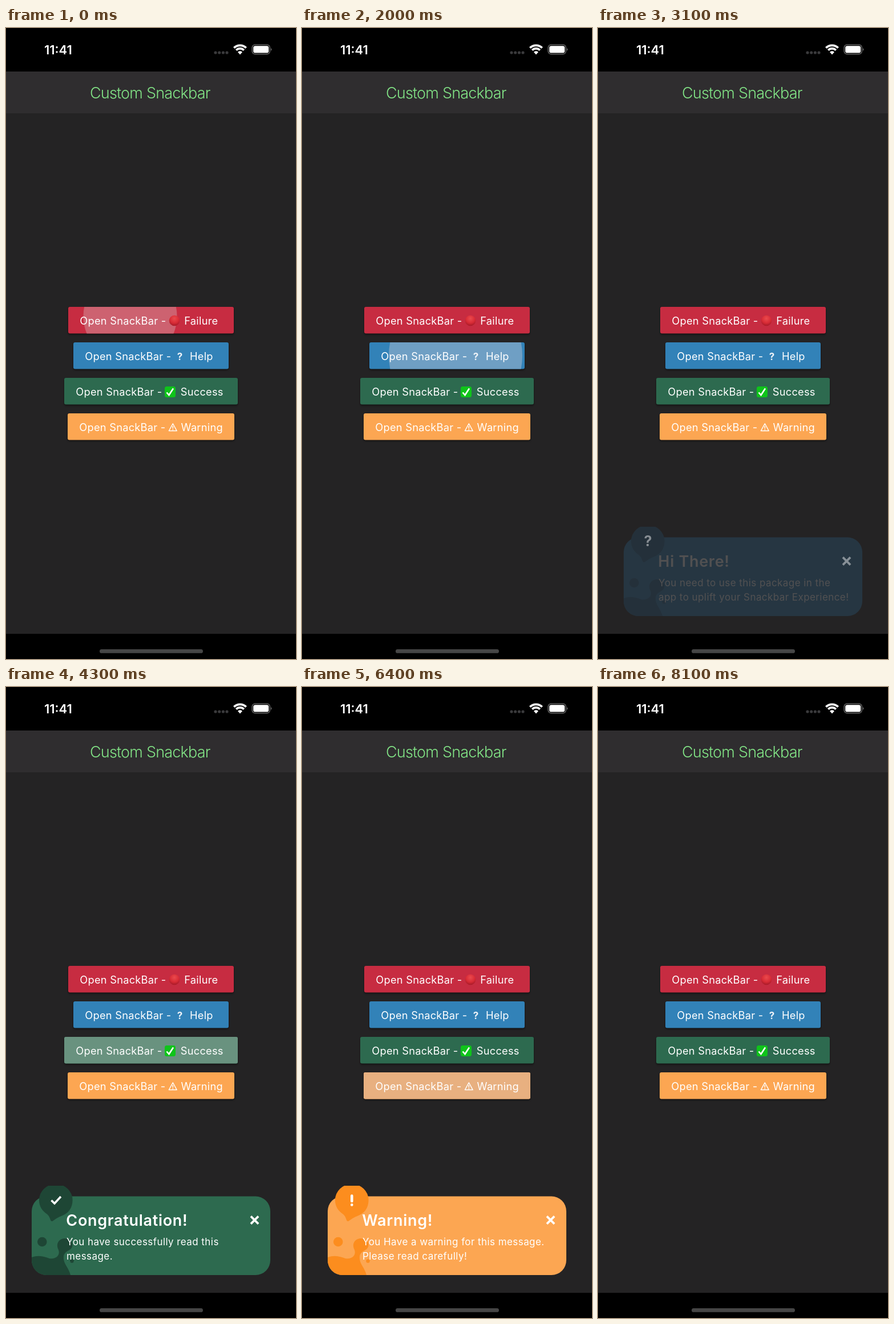
An HTML page that plays this animation: 508x1102 px, repeating every 8300 ms.

```html
<!DOCTYPE html>
<html lang="en">
<head>
<meta charset="utf-8">
<title>Custom Snackbar</title>
<style>
  html, body { margin: 0; width: 100%; height: 100%; overflow: hidden; background: #000; }
  svg { display: block; width: 508px; height: 1102px; font-family: Inter, Roboto, sans-serif; fill: #fff; }
  text { white-space: pre; }
  .btn { filter: drop-shadow(0 2px 1.5px #0007); }
  .label { font-size: 18.24px; letter-spacing: .25px; }
  .head { font-size: 27px; font-weight: 600; letter-spacing: .7px; }
  .msg { font-size: 17px; letter-spacing: .43px; }
  .line { fill: none; stroke: #fff; }
</style>
</head>
<body>
<svg viewBox="0 0 508 1102">
  <defs>
    <radialGradient id="ball" cx=".5" cy=".3" r=".7">
      <stop offset="0" stop-color="#ea4a4e"/><stop offset=".6" stop-color="#d92c36"/><stop offset="1" stop-color="#a81a28"/>
    </radialGradient>
    <clipPath id="card"><rect x="45" y="889.5" width="418" height="137.5" rx="26"/></clipPath>
    <clipPath id="top"><rect x="45" y="871" width="90" height="70"/></clipPath>
  </defs>
  <rect y="76" width="508" height="982" fill="#242324"/>
  <rect y="76" width="508" height="73" fill="#2f2d2f"/>
  <text x="67" y="46" font-size="22" font-weight="600">11:41</text>
  <g fill="#3a3a3c">
    <circle cx="367" cy="43" r="2.6"/><circle cx="373.7" cy="43" r="2.6"/>
    <circle cx="380.4" cy="43" r="2.6"/><circle cx="387" cy="43" r="2.6"/>
  </g>
  <path class="line" stroke-width="3.6" d="M399.3 34.8A15.2 15.2 0 0 1 420.7 34.8M403.2 38.7A9.6 9.6 0 0 1 416.8 38.7"/>
  <path d="M410 46.5L406 42A5.6 5.6 0 0 1 414 42Z"/>
  <rect x="431.2" y="29.2" width="31" height="16.4" rx="5" fill="none" stroke="#777" stroke-width="1.3"/>
  <rect x="433.2" y="31.2" width="27" height="12.4" rx="3.4"/>
  <path d="M464 35q3 2.4 0 5z" fill="#777"/>
  <text x="147" y="122.5" font-size="27" font-weight="300" letter-spacing="-.8" fill="#82e486">Custom Snackbar</text>
  <g id="buttons"></g>
  <g id="bars"></g>
  <rect x="164" y="1085" width="181" height="6.8" rx="3.4" fill="#464646"/>
</svg>
<script>
const cross = (x, y, r) => `<path class="line" stroke-width="3.7" d="M${x - r} ${y - r}l${2 * r} ${2 * r}m0 ${-2 * r}l${-2 * r} ${2 * r}"/>`;

// tap: press time, hide: start of fade out, spot: centre of the ripple
const items = [
  { tap: 0, hide: 1200, x: 109, w: 290, y: 487, color: '#c72c41', dark: '#9a2233', lit: '#cd6270', spot: [217.5, 503],
    name: 'Failure', nameX: 312.3, title: 'On Snap!', lines: ['You have failed to read this failure', 'message.'],
    emoji: '<circle cx="295" cy="511" r="9.2" fill="url(#ball)"/>',
    icon: cross(87.3, 896, 6.4) },
  { tap: 1900, hide: 3000, x: 118, w: 272, y: 549, color: '#3282b8', dark: '#27658f', lit: '#6f9fc4', spot: [269, 572],
    name: 'Help', nameX: 322, title: 'Hi There!', lines: ['You need to use this package in the', 'app to uplift your Snackbar Experience!'],
    emoji: '<text x="304.5" y="579.5" font-size="17" font-weight="700" text-anchor="middle" fill="#eef3f8">?</text>',
    icon: '<text x="87.5" y="905" font-size="25" font-weight="700" text-anchor="middle">?</text>' },
  { tap: 4100, hide: 5500, x: 102, w: 304, y: 611, color: '#2d6a4f', dark: '#1e4635', lit: '#69927f', spot: [288, 634],
    name: 'Success', nameX: 305.8, title: 'Congratulation!', lines: ['You have successfully read this', 'message.'],
    emoji: '<rect x="278" y="626" width="19" height="19" rx="3.5" fill="#0fc41a"/><path class="line" stroke-width="2.6" d="M281.5 636.5l4 4.500l7.500-11.500"/>',
    icon: '<path class="line" stroke-width="3.6" d="M79.500 896.500l5.500 5.500l11-12"/>' },
  { tap: 6200, hide: 7800, x: 108, w: 292, y: 673, color: '#fca652', dark: '#fc8d1e', lit: '#e8b080', spot: [258, 696],
    name: 'Warning', nameX: 306.6, title: 'Warning!', lines: ['You Have a warning for this message.', 'Please read carefully!'],
    emoji: '<path class="line" stroke-width="1.5" stroke-linejoin="round" d="M292.300 691l6.900 12.500h-13.800zM292.300 695v4.500m0 1.200v1.500"/>',
    icon: '<path class="line" stroke-width="4.600" stroke-linecap="round" d="M87.300 888.500v9.500m0 6.300v.2"/>' },
];

const button = (b, i) => `
  <clipPath id="b${i}"><rect x="${b.x}" y="${b.y}" width="${b.w}" height="46.500" rx="3"/></clipPath>
  <rect class="btn" x="${b.x}" y="${b.y}" width="${b.w}" height="46.500" rx="3" fill="${b.color}"/>
  <g clip-path="url(#b${i})"><circle class="ripple" cx="${b.spot[0]}" cy="${b.spot[1]}" fill="${b.lit}"/></g>
  <text class="label" x="${b.x + 20.3}" y="${b.y + 30.5}">Open SnackBar -</text>${b.emoji}
  <text class="label" x="${b.nameX}" y="${b.y + 30.5}">${b.name}</text>`;

const bar = b => `
  <g class="body">
    <g clip-path="url(#card)">
      <rect x="45" y="889" width="418" height="139" fill="${b.color}"/>
      <g fill="${b.dark}">
        <circle cx="63.300" cy="969" r="8.300"/><circle cx="115.500" cy="1002.500" r="3.200"/>
        <path d="M45 996C58 991 68 995 76 998C90 1000 96 990 91 981C87 971 94 963 103 963C112 963 118 970 116 977C114 985 103 984 101 994C100 1008 109 1012 113 1027H45Z"/>
      </g>
    </g>
    <path clip-path="url(#top)" fill="${b.dark}" d="M58 896A29.300 28 0 1 1 116.600 896C116.600 910 109 919 99 923C91 926 87 929 82 932.500Q79 934 78 931C76 925 75 923 71 920C63 914 58 907 58 896Z"/>
    <text class="head" x="105.300" y="941">${b.title}</text>
    <text class="msg" x="106" y="975">${b.lines[0]}</text>
    <text class="msg" x="106" y="999.500">${b.lines[1]}</text>
  </g>
  <g class="icons">${b.icon}${cross(435.5, 931, 6.6)}</g>`;

const fill = (id, draw) => document.getElementById(id).innerHTML = items.map(draw).join('');
fill('buttons', button);
fill('bars', bar);
const all = s => [...document.querySelectorAll(s)];
const ripples = all('.ripple'), bodies = all('.body'), icons = all('.icons');

const LOOP = 8300, STEP = 100;
const clamp = v => Math.max(0, Math.min(1, v));

function draw(t) {
  items.forEach((b, i) => {
    const age = t - b.tap;
    const radius = age < 200 ? 82 + age * .35 : 320;
    const glow = age < 0 ? 0 : clamp((500 - age) / 300);
    const shown = age < 200 ? 0 : (1 - clamp((t - b.hide + 50) / 300)) ** 2.3;
    ripples[i].setAttribute('r', radius);
    ripples[i].setAttribute('opacity', glow);
    bodies[i].setAttribute('opacity', shown);
    icons[i].setAttribute('opacity', Math.sqrt(shown));
  });
}

// the screen refreshes ten times a second
const start = performance.now();
function frame() {
  const t = (performance.now() - start) % LOOP;
  draw(Math.floor(t / STEP) * STEP);
  requestAnimationFrame(frame);
}
frame();
</script>
</body>
</html>
```
